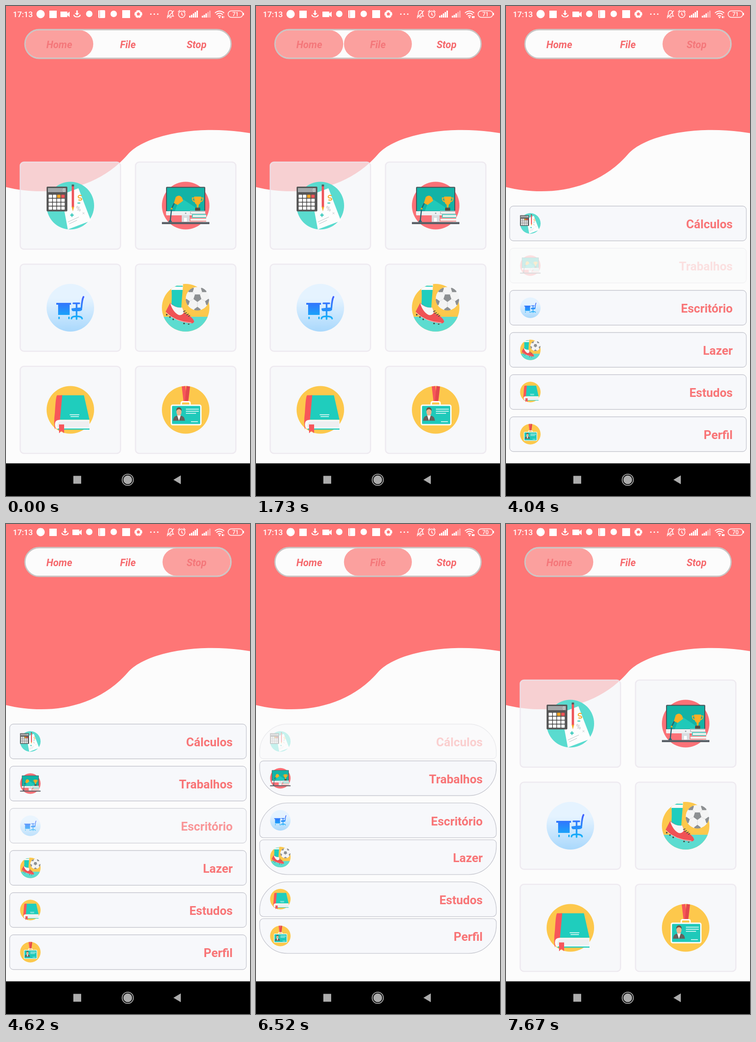
An HTML page for the animation above (8000 ms loop, 529 by 1058 pixels).

```html
<!DOCTYPE html>
<html lang="pt">
<head>
<meta charset="utf-8">
<style>
  html, body { margin: 0; width: 100%; height: 100%; overflow: hidden; background: #fcfcfc; }
  svg.stage { display: block; width: 100vw; height: 100vh; }
  text { font-family: Roboto, sans-serif; }
  .tab text { font: italic bold 21.6px Roboto, sans-serif; fill: #f5696d; text-anchor: middle; }
  .tab.on text { fill: #f4777a; }
  .tab rect { fill: #fba09e; visibility: hidden; }
  .tab.on rect { visibility: visible; }
  .card { fill: rgba(246, 247, 250, .7); }
  .edge { fill: none; stroke: rgba(236, 231, 238, .8); stroke-width: 2.6; }
  .row { fill: #f7f8fb; stroke: #c6c7cf; stroke-width: 1.3; }
  .label { font-size: 26px; font-weight: bold; fill: #f87577; text-anchor: end; }
</style>
</head>
<body>
<svg class="stage" viewBox="0 0 529 1058" preserveAspectRatio="none">
  <defs>
    <linearGradient id="sky" x2="0" y2="1"><stop offset=".3" stop-color="#e5f3ff"/><stop offset="1" stop-color="#a9d8fc"/></linearGradient>
    <linearGradient id="blue" gradientUnits="userSpaceOnUse" x1="0" y1="27" x2="0" y2="77"><stop offset="0" stop-color="#3f5cff"/><stop offset="1" stop-color="#12b4f8"/></linearGradient>
    <clipPath id="disc"><circle cx="51.5" cy="51.5" r="51.5"/></clipPath>
    <clipPath id="ballClip"><circle cx="77" cy="32" r="25.5"/></clipPath>

    <!-- calculator and paper -->
    <symbol id="icon0" viewBox="0 0 103 103" overflow="visible">
      <circle cx="51.5" cy="51.5" r="51.5" fill="#5adbcf"/>
      <path d="M32 28 69 14 96 84 46 103Z" fill="#fdfdfd"/>
      <path d="M46 87 70 76M49 91 66 83" stroke="#b9c0c4"/>
      <path d="M51 72h8M55 68v8M67 46h6" stroke="#1fc3b3" stroke-width="2"/>
      <path d="M78 66l4 4m0-4-4 4" stroke="#c0c5c8"/>
      <path d="M76 30c-8-3-10 5-4 5s6 7-3 4" fill="none" stroke="#f5a623" stroke-width="2"/>
      <text x="64" y="63" font-size="14" fill="#b3b8bb">%</text>
      <rect y="10.5" width="45" height="53.5" rx="2" fill="#565656"/>
      <rect x="3" y="13.5" width="39" height="9" fill="#a3a6a8"/>
      <text x="35" y="21" font-size="9" fill="#eee">0</text>
      <g id="keys"></g>
      <path d="M54.5 9h5v46h-5z" fill="#ee5258"/>
      <path d="M54.5 6h5v4h-5z" fill="#555"/>
      <path d="M54.5 54h5l-2.5 10z" fill="#f5a623"/>
    </symbol>

    <!-- computer desk -->
    <symbol id="icon1" viewBox="0 0 103 103" overflow="visible">
      <circle cx="51.5" cy="51.5" r="51.5" fill="#fb7177"/>
      <rect x="9" y="11" width="85" height="56" rx="2" fill="#4b5157"/>
      <path d="M11 13h81v50H11z" fill="#12b3a6"/>
      <path d="M34 48 46 38 84 63H28z" fill="#20c9b9"/>
      <path d="M9 63.5h85v7q0 2-2 2H11q-2 0-2-2z" fill="#eef1f2"/>
      <circle cx="51.5" cy="68" r="1.6" fill="#9aa3a8"/>
      <path d="M43 72h17v15H43z" fill="#d8dde0"/>
      <path d="M48 78h6v8h-6z" fill="#fff"/>
      <path d="M18 85 21 58 33 34" fill="none" stroke="#27616b" stroke-width="2.4"/>
      <path d="M26 46 30 33Q38 26 44 35L46 41 34 50z" fill="#f9ae25"/>
      <circle cx="21" cy="58" r="2" fill="#f9ae25"/>
      <path d="M14 87q4-9 8 0z" fill="#1d6a75"/>
      <path d="M70 32h15q0 16-5 17l-1 7h-3l-1-7q-5-1-5-17z" fill="#f9ae25"/>
      <path d="M70 35h-4q0 8 6 8M85 35h4q0 8-6 8" fill="none" stroke="#f9ae25" stroke-width="2"/>
      <path d="M72 56h11v7H72z" fill="#554d43"/>
      <path d="M61 63h33v7H61zM65 70h31v8H65zM60 78h36v9H60z" fill="#f6f6f2"/>
      <path d="M94 64H62v5h32" fill="none" stroke="#aebcc2" stroke-width="1.5"/>
      <path d="M96 71H66v6h30" fill="none" stroke="#20c0b1" stroke-width="1.5"/>
      <path d="M96 79H61v6h35" fill="none" stroke="#ef6d70" stroke-width="1.5"/>
      <path d="M0 87h103v4.5H0z" fill="#5a6067"/>
    </symbol>

    <!-- desk and chair -->
    <symbol id="icon2" viewBox="0 0 103 103" overflow="visible">
      <circle cx="51.5" cy="51.5" r="51.5" fill="url(#sky)"/>
      <path d="M21 41h32v4h-3v22H25V45h-4zM25.5 71h3v5h-3zM47 71h3v5h-3z" fill="url(#blue)"/>
      <path d="M80 28Q77 33 75.5 52M58 42h13M65 43v29M54 75q0-5 11-5t12 5M65 70v6" fill="none" stroke="url(#blue)" stroke-width="3.5" stroke-linecap="round"/>
      <path d="M54 53q12-2 23-2v5q-2 3-7 3H58q-4 0-4-6z" fill="url(#blue)"/>
    </symbol>

    <!-- boot and ball -->
    <symbol id="icon3" viewBox="0 0 103 103" overflow="visible">
      <g clip-path="url(#disc)">
        <path d="M0 0h103v103H0z" fill="#fdc84c"/>
        <path d="M0 71h103v32H0z" fill="#5cdcd0"/>
        <path d="M22 0h24l-1 14H20z" fill="#fafafa"/>
        <path d="M21 5h24" stroke="#1fccbc" stroke-width="2"/>
        <path d="M21 13h24l-2 24-1 16-22-3q2-17 1-37z" fill="#1fcdbd"/>
      </g>
      <path d="M8 60 18 41Q30 53 44 51L50 64Q66 70 70 81 69 86 62 85 28 82 8 60Z" fill="#f05255"/>
      <path d="M18 42Q30 53 44 51L48 61Q44 69 36 67 24 61 18 42Z" fill="#f7f7f7"/>
      <path d="M46 60l5-2M49 64l5-2M53 67l5-2M57 70l4-2" stroke="#444" stroke-width="1.6"/>
      <path d="M9 62Q29 82 64 84" fill="none" stroke="#fbdcdc"/>
      <path d="M11 65l-1 3M18 70l-1 3M25 75l-1 3M48 84v3M58 86v2" stroke="#47443f" stroke-width="3"/>
      <g clip-path="url(#ballClip)">
        <circle cx="77" cy="32" r="25.5" fill="#f4f4f4"/>
        <g id="patches"></g>
      </g>
    </symbol>

    <!-- book -->
    <symbol id="icon4" viewBox="0 0 103 103" overflow="visible">
      <circle cx="51.5" cy="51.5" r="51.5" fill="#fdc84c"/>
      <path d="M31 20H81L93 73H29z" fill="#1fcdbd"/>
      <path d="M23 20h11L29 73q-11 2-10 17l-1 4q-3-13 0-37 2-37 5-37z" fill="#f7565a"/>
      <path d="M93 73H28q-10 0-10 10t8 10h67z" fill="#fafafa"/>
      <path d="M92 76H30q-8 3-7 13h69z" fill="#efeff1"/>
      <path d="M24 93h69" stroke="#1fcdbd" stroke-width="2.5"/>
      <path d="M27 83h11v19l-5.5-5-5.5 5z" fill="#f7565a"/>
      <path d="M50 62h21M52 66h18" stroke="#fff" stroke-width="1.5"/>
    </symbol>

    <!-- badge -->
    <symbol id="icon5" viewBox="0 0 103 103" overflow="visible">
      <circle cx="51.5" cy="51.5" r="51.5" fill="#fdc84c"/>
      <path d="M43 1l8-1 3 35h-7z" fill="#f7565a"/>
      <path d="M53 0l8 1-4 34h-7z" fill="#e3474d"/>
      <path d="M42 41v-4q0-3 3-3h13q3 0 3 3v4" fill="none" stroke="#fff" stroke-width="3"/>
      <rect x="20.5" y="41.5" width="64" height="42" rx="3" fill="#1fc9ba" stroke="#fdfdfd" stroke-width="3"/>
      <path d="M24 75q1-10 9-11h8q8 1 9 11z" fill="#67605c"/>
      <path d="M33 63h8l-4 12z" fill="#fff"/>
      <ellipse cx="37" cy="56" rx="5.5" ry="8" fill="#eab690"/>
      <path d="M31 54q0-8 6-8t6 8q-3-4-6-4t-6 4z" fill="#665346"/>
      <path d="M52 50h28M52 54.5h28M52 59h22M63 77h15" stroke="#fff" stroke-width="1.6"/>
    </symbol>
  </defs>

  <rect width="529" height="1058" fill="#fcfcfc"/>
  <path d="M0 0H529V274.5C410 255 300 280 264.5 320C195 400 88 412 0 391Z" fill="#fe7676"/>

  <rect x="41" y="51" width="447" height="62" rx="31" fill="#fcfcfc"/>
  <g id="tabs"></g>
  <rect x="41" y="51" width="447" height="62" rx="31" fill="none" stroke="#c9c5c4" stroke-width="2.8"/>

  <g id="home"></g>
  <g id="file"></g>
  <g id="stop"></g>

  <!-- status bar -->
  <g fill="#fff">
    <text x="15" y="24" font-size="17" font-weight="500">17:13</text>
    <circle cx="75" cy="17.5" r="9"/>
    <rect x="94" y="10" width="16" height="16"/>
    <path id="video" d="M-10-6H4q1 0 1 1v3L10-6V6L5 2v3q0 1-1 1H-9q-1 0-1-1z"/>
    <path id="download" d="M-1.500-8h3v6H5L0 3-5-2h3.500zM-8 2q1 5 8 5t8-5l-2-1q-1 4-6 4t-6-4z"/>
    <circle cx="180.5" cy="17" r="7"/>
    <path d="M202 9h11q2 0 2 2v13q0 2-2 2h-11q-2 0-2-2V11q0-2 2-2z"/>
    <path d="M203 9v16" stroke="#fe7676"/>
    <circle cx="233.5" cy="17" r="7"/>
    <rect x="252" y="9" width="17" height="17"/>
    <circle cx="287" cy="17.5" r="8.5"/>
    <path d="M287 14l3 2.500-1 3.500h-4l-1-3.500zM280 13l3-2M291 11l3 2M279 21l3 1M292 22l3-1M287 24v2" fill="#fe7676" stroke="#fe7676" stroke-width="1.2"/>
    <path d="M314 17.5h.1M321.5 17.5h.1M329 17.5h.1" stroke="#fff" stroke-width="3.2" stroke-linecap="round"/>
  </g>
  <g fill="none" stroke="#fff" stroke-width="1.5">
    <path d="M350 22q2-2 2-7 0-5 4.5-5t4.5 5q0 5 2 7zM354 25h5M364 10 349 26"/>
    <circle cx="381" cy="18" r="7"/>
    <path d="M381 14v5l3 1M373 13l4-4M389 13l-4-4"/>
    <g stroke-width="3">
      <path d="M398.5 25v-4M402.5 25v-6M406.5 25v-9M410.5 25v-12M414.5 25V10M426 25v-4M430 25v-6M434 25v-9"/>
      <path d="M438 25v-12M442 25V10" opacity=".45"/>
    </g>
    <path d="M453 15q10-8 20 0M456 18.5q7-6 14 0M459.5 22q3.5-3 7 0" stroke-width="2"/>
    <circle cx="463" cy="24.5" r="1"/>
    <rect x="481.5" y="10.5" width="32" height="14" rx="7"/>
  </g>
  <path d="M468 23l1.500-2 1.500 2v3h-3z" fill="#fff"/>
  <path id="traffic" d="M471 22h3v2l-1.500 3-1.500-3z" fill="#fff"/>
  <path d="M515 15v5" stroke="#fff" stroke-width="2"/>
  <text id="battery" x="497.5" y="22" font-size="12" font-weight="500" fill="#fff" text-anchor="middle"></text>

  <!-- navigation bar -->
  <rect y="987.5" width="529" height="70.5"/>
  <g fill="#acacac">
    <rect x="146" y="1014.5" width="17" height="17"/>
    <circle cx="264" cy="1023" r="9.5"/>
    <circle cx="264" cy="1023" r="12.2" fill="none" stroke="#acacac" stroke-width="1.8"/>
    <path d="M363 1023l16-9.5v19z"/>
  </g>
</svg>
<script>
const $ = id => document.getElementById(id);
const range = (n, make) => Array.from({ length: n }, (_, i) => make(i)).join('');
const labels = ['Cálculos', 'Trabalhos', 'Escritório', 'Lazer', 'Estudos', 'Perfil'];

const icon = (i, x, y, size) => `<use href="#icon${i}" x="${x}" y="${y}" width="${size}" height="${size}"/>`;

$('keys').innerHTML = range(16, i => {
  const fill = { 2: '#f5a623', 3: '#f05458' }[i] || '#fff';
  return `<rect x="${4.5 + i % 4 * 9.1}" y="${28 + (i >> 2) * 8.5}" width="7.5" height="6.8" rx="1" fill="${fill}"/>`;
});

const pentagon = (x, y, r, turn) => '<polygon fill="#8d9092" points="' + range(5, k => {
  const a = turn + k * Math.PI * .4;
  return `${x + r * Math.sin(a)},${y - r * Math.cos(a)} `;
}) + '"/>';
$('patches').innerHTML = pentagon(77, 30, 9, Math.PI) + range(5, k => {
  const a = Math.PI + k * Math.PI * .4, s = Math.sin(a), c = -Math.cos(a);
  return `<path d="M${77 + 9 * s} ${30 + 9 * c}L${77 + 19 * s} ${32 + 19 * c}" stroke="#ddd"/>` +
    pentagon(77 + 25 * s, 32 + 25 * c, 7.5, a + Math.PI);
});

$('tabs').innerHTML = ['Home', 'File', 'Stop'].map((name, i) => `<g class="tab">
  <rect x="${42 + i * 148.7}" y="52.2" width="147.2" height="59.6" rx="29.8"/>
  <text x="${115.5 + i * 148.8}" y="90.5">${name}</text></g>`).join('');

$('home').innerHTML = range(6, i => {
  const x = 30 + i % 2 * 250, y = 336.5 + (i >> 1) * 220.5;
  const box = `x="${x + .8}" y="${y + .5}" width="217.5" height="188" rx="8"`;
  return `<rect class="card" ${box}/><rect class="edge" ${box}/>` + icon(i, x + 58, y + 43, 103);
});

// Row outline with separate top and bottom corner radii
const outline = (top, bottom) => `M8 ${top}a${top} ${top} 0 0 1 ${top} ${-top}H${521 - top}a${top} ${top} 0 0 1 ${top} ${top}
  V${75 - bottom}a${bottom} ${bottom} 0 0 1 ${-bottom} ${bottom}H${8 + bottom}a${bottom} ${bottom} 0 0 1 ${-bottom} ${-bottom}Z`;
const list = (place, shape) => range(6, i => `<g transform="translate(0 ${place(i)})">
  <path class="row" d="${shape(i)}"/>${icon(i, 30.5, 15.2, 44.5)}
  <text class="label" x="491.5" y="48.3">${labels[i]}</text></g>`);
$('file').innerHTML = list(i => 432 + (i >> 1) * 170.3 + i % 2 * 79.5, i => i % 2 ? outline(8, 60) : outline(60, 8));
$('stop').innerHTML = list(i => 432 + i * 91, () => outline(8, 8));

const clamp = v => Math.max(0, Math.min(1, v));
const ease = v => v < .5 ? 2 * v * v : 1 - 2 * (1 - v) ** 2;
const within = (t, spans) => spans.some(([from, to]) => t >= from && t < to);

// A tapped row dims to 0.2 in 100 ms and recovers in 250 ms
const tapOpacity = (t, start) =>
  1 - .8 * (ease(clamp((t - start) / 100)) - ease(clamp((t - start - 100) / 250)));

const pages = {
  home: [[0, 2140], [7550, 8000]],
  file: [[2140, 3130], [5770, 7550]],
  stop: [[3130, 5770]]
};
const pressed = [
  [[0, 2140], [7300, 8000]],
  [[1730, 3130], [5480, 7550]],
  [[2760, 5770]]
];
const taps = { stop: [3630, 3940, 4370, 4840], file: [6350, 6700] };

function draw(now) {
  const t = now % 8000;
  for (const id in pages) $(id).style.display = within(t, pages[id]) ? '' : 'none';
  pressed.forEach((spans, i) => $('tabs').children[i].classList.toggle('on', within(t, spans)));
  for (const id in taps)
    taps[id].forEach((start, i) => $(id).children[i].setAttribute('opacity', tapOpacity(t, start)));

  const swap = 26 * ease(clamp((t - 870) / 280));
  $('video').setAttribute('transform', `translate(${128 + swap} 18)`);
  $('download').setAttribute('transform', `translate(${154 - swap} 17.5)`);
  $('battery').textContent = t < 4900 ? 71 : 70;
  $('traffic').setAttribute('opacity', within(t, [[870, 3630], [6140, 8000]]) ? 1 : .4);
  requestAnimationFrame(draw);
}
draw(performance.now());
</script>
</body>
</html>
```
